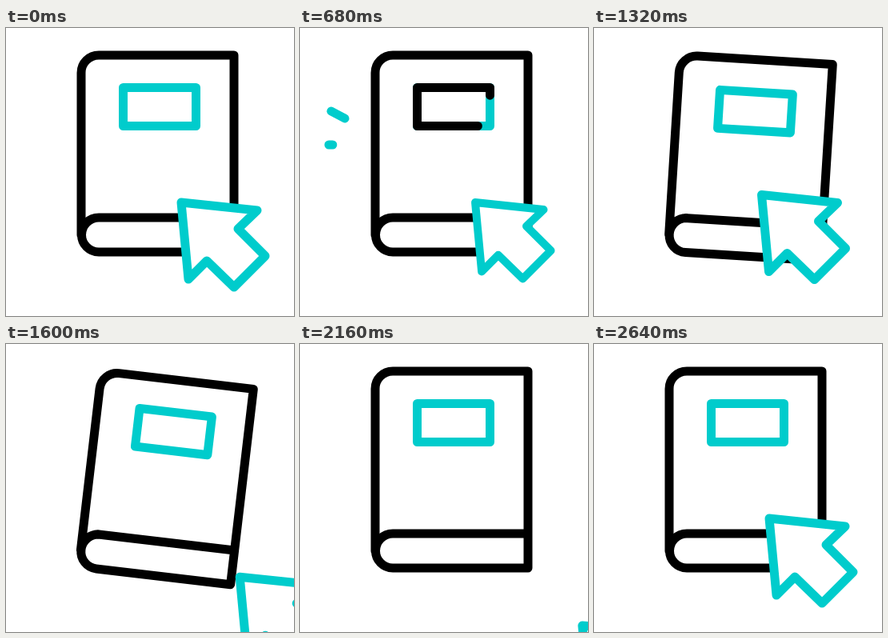
Recreate the animation shown at these times as an HTML page. Size 360 by 360 pixels, loop 2680 ms.

```html
<!DOCTYPE html>
<html lang="en">
<head>
<meta charset="utf-8">
<title>Book and cursor</title>
<style>
  html, body { margin: 0; height: 100%; overflow: hidden; background: #fff; }
  svg { display: block; width: 100vw; height: 100vh; }
  path { fill: none; stroke: #000; stroke-width: 11; stroke-linecap: round; stroke-linejoin: round; }
  .accent { stroke: #00cccc; }
  #cursor { fill: #fff; }
</style>
</head>
<body>
<svg viewBox="0 0 360 360">
  <g id="book">
    <path d="M94 259V56A22 22 0 0 1 116 34H285V280H116A21.5 21.5 0 0 1 116 237H285M94 259A22 22 0 0 1 116 237"/>
    <path class="accent" d="M237.5 122.5H146.5V74.5H237.5Z"/>
    <path id="trace" pathLength="1" d="M237.5 122.5H146.5V74.5H237.5Z"/>
  </g>
  <path class="accent spark" pathLength="1" d="M39 104L56 113"/>
  <path class="accent spark" pathLength="1" d="M36 146H57"/>
  <path class="accent spark" pathLength="1" d="M39 188L56 179"/>
  <path class="accent" id="cursor" d="M219 218L314 228L290 251L324 285L285 324L251 291L228 314Z"/>
</svg>
<script>
  const LOOP = 2680;
  const book = document.getElementById('book');
  const trace = document.getElementById('trace');
  const cursor = document.getElementById('cursor');
  const sparks = document.querySelectorAll('.spark');

  // Eased 0..1 progress between two times
  const ramp = (t, from, to) => {
    const u = Math.min(1, Math.max(0, (t - from) / (to - from)));
    return u * u * (3 - 2 * u);
  };

  // Eased value through [time, value] keys
  const track = (t, keys) => keys.slice(1).reduce(
    (value, [time, next], i) => value + (next - keys[i][1]) * ramp(t, keys[i][0], time),
    keys[0][1]);

  // Show only the part of a path between two fractions
  const trim = (path, start, end) => {
    const length = end - start;
    path.style.display = length > 0.001 ? '' : 'none';
    path.setAttribute('stroke-dasharray', `${length} 3`);
    path.setAttribute('stroke-dashoffset', -start);
  };

  const angleKeys = [[1080, 0], [1560, 7.1], [1920, -4.2], [2150, 0]];
  const shiftKeys = [[1120, 0], [1320, -9.5], [1880, 155], [2015, 155], [2645, 0]];
  const scaleKeys = [[160, 1], [500, 0.8], [860, 1]];

  function draw(now) {
    const t = now % LOOP;
    book.setAttribute('transform', `rotate(${track(t, angleKeys)} 106 253)`);
    trim(trace, ramp(t, 613, 1093), ramp(t, 313, 793));
    sparks.forEach((spark, i) => {
      const begin = 500 + i * 125;
      trim(spark, ramp(t, begin + 190, begin + 370), ramp(t, begin, begin + 180));
    });
    const shift = track(t, shiftKeys);
    const scale = track(t, scaleKeys);
    cursor.setAttribute('transform',
      `translate(${219 + shift} ${218 + shift}) scale(${scale}) translate(-219 -218)`);
    requestAnimationFrame(draw);
  }
  requestAnimationFrame(draw);
</script>
</body>
</html>
```
